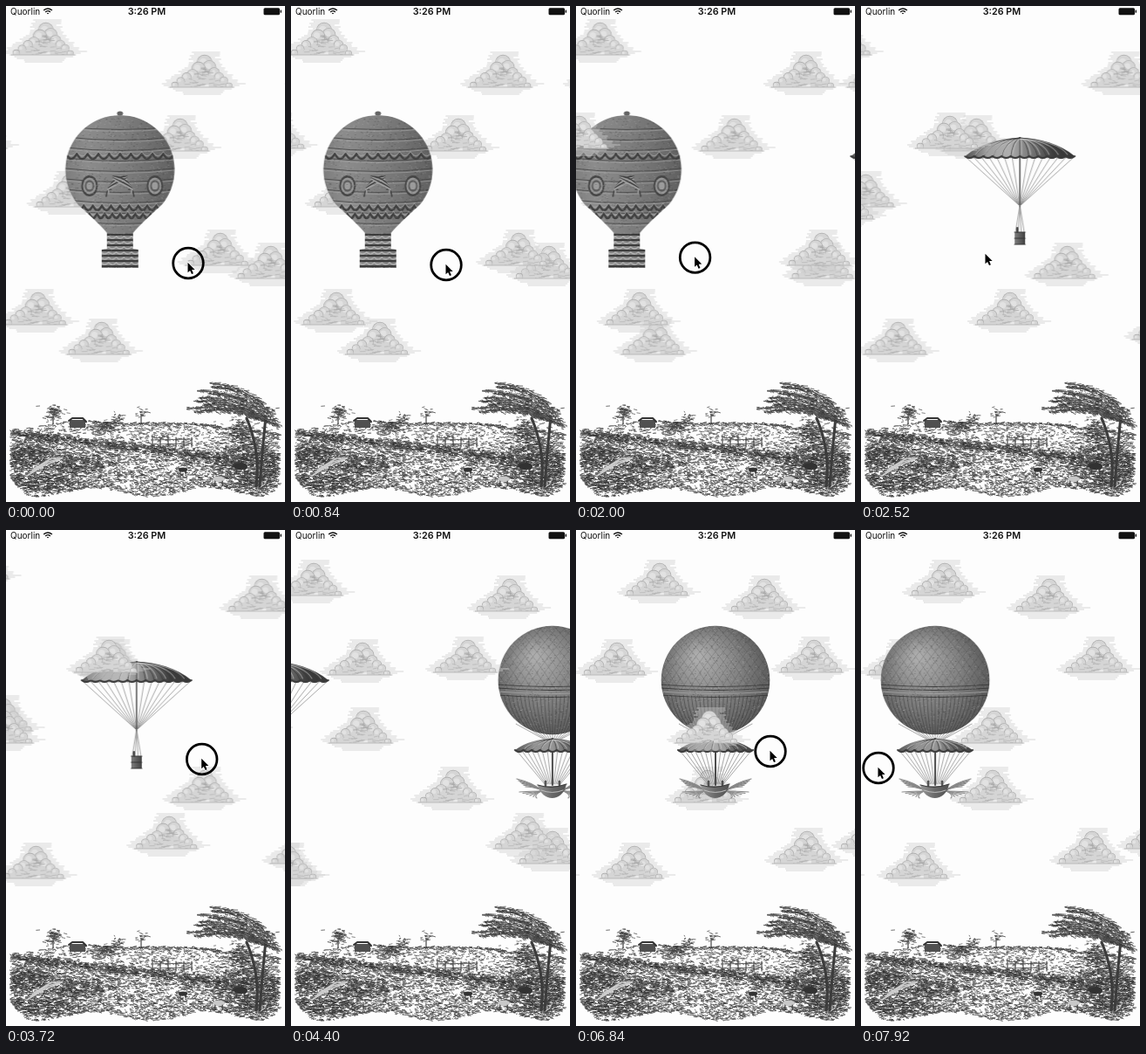
An HTML page with a canvas for the animation above (8000 ms loop, 320 by 568 pixels).

```html
<!DOCTYPE html>
<html>
<head>
<meta charset="utf-8">
<style>
  html, body { margin: 0; width: 320px; height: 568px; overflow: hidden; background: #fdfdfd; }
  canvas { display: block; }
</style>
</head>
<body>
<canvas id="stage" width="320" height="568"></canvas>
<script>
const stage = document.getElementById('stage').getContext('2d');
const LOOP = 8000, TAU = Math.PI * 2;

let seed = 7;
function rand(a = 0, b = 1) {
  seed = (seed * 1664525 + 1013904223) % 4294967296;
  return a + (b - a) * seed / 4294967296;
}
const gray = (v, a = 1) => `rgba(${v | 0},${v | 0},${v | 0},${a})`;
const clamp = (v, lo, hi) => Math.min(hi, Math.max(lo, v));
const mix = (a, b, u) => a + (b - a) * u;

// Pre-renders a picture whose origin sits at (ox, oy).
function sprite(w, h, ox, oy, draw) {
  const canvas = document.createElement('canvas');
  canvas.width = w;
  canvas.height = h;
  const c = canvas.getContext('2d');
  c.translate(ox, oy);
  c.lineCap = c.lineJoin = 'round';
  draw(c);
  return (x, y) => stage.drawImage(canvas, x - ox, y - oy);
}

function line(c, color, width, ...pts) {
  c.strokeStyle = color;
  c.lineWidth = width;
  c.beginPath();
  for (let i = 0; i < pts.length; i += 2) c.lineTo(pts[i], pts[i + 1]);
  c.stroke();
}

function curve(c, color, width, x0, y0, x1, y1, x2, y2) {
  c.strokeStyle = color;
  c.lineWidth = width;
  c.beginPath();
  c.moveTo(x0, y0);
  c.quadraticCurveTo(x1, y1, x2, y2);
  c.stroke();
}

function oval(c, color, x, y, rx, ry) {
  c.fillStyle = color;
  c.beginPath();
  c.ellipse(x, y, rx, ry, 0, 0, TAU);
  c.fill();
}

function swags(c, half, y, count, depth, color, width) {
  const step = 2 * half / count;
  for (let x = -half; x < half - 1; x += step)
    curve(c, color, width, x, y, x + step / 2, y + depth * 2, x + step, y);
}

function grain(c, n, half, top, bottom) {
  for (let i = 0; i < n; i++) {
    c.fillStyle = gray(rand() < .55 ? 40 : 200, .28);
    c.fillRect(rand(-half, half), rand(top, bottom), 1.4, .8);
  }
}

function shade(c, half, ...tones) {
  const g = c.createLinearGradient(-half, 0, half, 0);
  tones.forEach((t, i) => g.addColorStop(i / (tones.length - 1), gray(t)));
  return g;
}

// ---- clouds ----
const cloud = sprite(108, 60, 54, 30, c => {
  const hatchHalf = u => u < .75 ? 13 + 58 * u * u : 46 - 110 * (u - .75);
  for (let y = -24; y < 25; y += 2) {
    const u = (y + 24) / 48, shift = 4 - 5 * u;
    line(c, gray(205), .8, shift - hatchHalf(u) + rand(-4, 3), y, shift + hatchHalf(u) + rand(-3, 4), y);
  }
  // Lobes climb from both ends towards an off-centre tower.
  const lobes = [];
  for (let i = 0; i < 11; i++) {
    const u = i / 5 - 1, rise = (1 - Math.abs(u)) ** 1.25;
    lobes.push([u * 31 + 3 * rise, 14 - 26 * rise + rand(-2, 2), 3.5 + 5 * rise]);
  }
  lobes.sort((a, b) => a[1] - b[1]);
  c.save();
  c.beginPath();
  c.rect(-50, -30, 100, 46);
  c.clip();
  for (const [x, y, r] of lobes) {
    oval(c, gray(168), x, y, r + .6, r + .6);
    oval(c, gray(213), x, y, r, r);
    c.fillRect(x - r, y, 2 * r, 20);
    oval(c, gray(226), x - 1.5, y - 1, r * .5, r * .5);
  }
  for (let i = 0; i < 45; i++) {
    const y = rand(-6, 16), half = 8 + y * 1.1, x = rand(-half, half);
    line(c, gray(165, .6), .8, x, y, x + rand(2, 7), y + rand(-1, 1));
  }
  c.restore();
  line(c, gray(178), .8, -37, 16, 37, 16);
});

// [x, y] at scroll 0; far clouds drift left, near ones right.
const farClouds = [[50, 40], [373, 77], [204, 150], [77, 214], [308, 296], [422, 366], [114, 383]];
const nearClouds = [[-227, 59], [210, 77], [-50, 147], [-170, 228], [228, 281], [19, 349], [-256, 383]];

// ---- aircraft ----
function canopy(c, half, top, base, scallops, tones) {
  const control = top - (base - top) / 3, step = 2 * half / scallops;
  c.beginPath();
  c.moveTo(-half, base);
  c.bezierCurveTo(-half * .45, control, half * .45, control, half, base);
  for (let x = half; x > 1 - half; x -= step)
    c.quadraticCurveTo(x - step / 2, base + 5, x - step, base + 1);
  c.fillStyle = shade(c, half, ...tones);
  c.fill();
  for (let x = -half + step; x < half - 1; x += step) {
    curve(c, gray(55, .7), 1, 0, top, x * .8, top + 3, x, base + 2);
    curve(c, gray(215, .5), 1.2, 1, top + 1, x * .8 + 2, top + 4, x + 2, base - 2);
  }
  swags(c, half, base, scallops, 2, gray(60), 2);
}

function ropes(c, count, spread, y0, y1, end = 0) {
  for (let i = 0; i < count; i++) {
    const u = 2 * i / (count - 1) - 1;
    line(c, gray(130), .7, u * spread, y0, u * end, y1);
  }
}

function ornateHalf(y) {
  if (y < 228) return Math.sqrt(Math.max(0, 62.5 ** 2 - (y - 187.5) ** 2));
  if (y < 260) return 15 + 32.5 * ((260 - y) / 32) ** 1.1;
  return y < 279 ? 15 : 21;
}

const ornateBalloon = sprite(136, 192, 68, -116, c => {
  oval(c, gray(100), 0, 123, 3.5, 2.5);
  c.save();
  c.beginPath();
  for (let y = 125; y <= 300; y++) c.lineTo(ornateHalf(y), y);
  for (let y = 300; y >= 125; y--) c.lineTo(-ornateHalf(y), y);
  c.fillStyle = shade(c, 63, 125, 140, 132, 122, 110, 96);
  c.fill();
  c.clip();
  for (let y = 138; y < 260; y += 12) {
    curve(c, gray(70, .8), 1, -63, y, 0, y + 7, 63, y);
    curve(c, gray(170, .6), 1, -63, y + 2, 0, y + 9, 63, y + 2);
  }
  for (const [y, half] of [[169, 62], [228, 52], [237, 44]]) {
    swags(c, half, y, 10, 6, gray(65), 2.6);
    swags(c, half, y - 2, 10, 5, gray(175, .7), 1);
  }
  for (const x of [-35, 40]) {
    [70, 150, 95, 155].forEach((tone, i) => oval(c, gray(tone), x, 206, 9.5 - 2 * i, 12 - 2.6 * i));
  }
  for (const s of [-1, 1]) {
    for (let i = 0; i < 4; i++) {
      curve(c, gray(i % 2 ? 160 : 65), 1.5, s * -8, 195 + i, s * (12 + 5 * i), 196 + 7 * i, s * (16 - 3 * i), 218 - 4 * i);
    }
  }
  for (let y = 262; y < 300; y += 6) {
    line(c, gray(60), 2, -22, y, 22, y);
    swags(c, 22, y + 2, 5, 2, gray(180), 1.2);
  }
  grain(c, 1500, 64, 124, 300);
  c.restore();
});

const parachute = sprite(136, 130, 68, -148, c => {
  ropes(c, 15, 62, 173, 229);
  line(c, gray(85), 1.4, 0, 152, 0, 230);
  canopy(c, 63, 151, 172, 12, [80, 160, 175, 120, 62, 55]);
  ropes(c, 4, 0, 228, 259, 5);
  c.fillStyle = shade(c, 6, 125, 65);
  c.fillRect(-6, 259, 12, 14);
  for (let y = 259; y <= 273; y += 7) line(c, gray(55), 1.2, -6, y, 6, y);
  line(c, gray(65), 2.2, -3, 254, -3, 259);
});

const wingedBalloon = sprite(136, 208, 68, -106, c => {
  ropes(c, 13, 42, 222, 240, 9);
  const ball = c.createRadialGradient(-20, 145, 4, -4, 168, 70);
  [172, 146, 118, 88].forEach((v, i) => ball.addColorStop(i / 3, gray(v)));
  c.save();
  c.beginPath();
  c.arc(0, 172, 62.3, 0, TAU);
  c.fillStyle = ball;
  c.fill();
  c.clip();
  for (let i = -14; i <= 14; i++) {
    for (const s of [-1, 1])
      curve(c, gray(60, .3), .7, i * 9 - s * 30, 105, i * 9 + s * 8, 145, i * 9 + s * 30, 182);
    curve(c, gray(50, .5), .9, i * 4.6, 190, i * 4.3, 215, i * 2.2, 236);
  }
  for (let i = 0; i < 4; i++) curve(c, gray(i === 2 ? 160 : 60), 1.2, -63, 177 + 4 * i, 0, 182 + 4 * i, 63, 177 + 4 * i);
  grain(c, 1100, 63, 110, 235);
  c.restore();

  ropes(c, 15, 40, 254, 291, 9);
  line(c, gray(75), 2, 0, 244, 0, 292);
  canopy(c, 43, 239, 252, 9, [85, 145, 150, 100, 65]);
  for (const s of [-1, 1]) {
    for (let i = 0; i < 6; i++) {
      curve(c, gray(135), 1.2, s * 14, 297, s * 24, 289 + i, s * (41 - i * 2), 285 + i * 1.8);
      curve(c, gray(140), 1.1, s * 13, 299, s * 22, 299 + i, s * (38 - i * 4), 300 + i * 1.4);
    }
    line(c, gray(80), 2.5, s * 8, 288, s * 8, 293);
  }
  c.beginPath();
  c.moveTo(-17, 292);
  c.quadraticCurveTo(0, 297, 16, 291);
  c.bezierCurveTo(12, 312, -12, 312, -17, 292);
  c.fillStyle = shade(c, 17, 150, 105, 80);
  c.fill();
  curve(c, gray(60), 1.3, -17, 292, 0, 297, 16, 291);
  curve(c, gray(190), 1, -13, 298, 0, 303, 12, 298);
});

// ---- engraved landscape ----
// Soft dark patches: [x, y, rx, ry].
const bushes = [[54, 465, 7, 7], [155, 467, 5, 3], [126, 472, 5, 4], [112, 483, 9, 5],
  [24, 516, 26, 13], [80, 524, 36, 7], [285, 525, 34, 26], [268, 487, 10, 10], [40, 546, 36, 8]];
const bell = (d, width) => Math.exp(-((d / width) ** 2));
const skyline = x => 477 + 8 * bell(x, 50) + 12 * clamp((x - 210) / 100, 0, 1) - 3 * bell(x - 80, 30);
const groundEnd = x => 557 + 5 * Math.sin(x / 21) - 20 * bell(x, 14) - 12 * bell(x - 314, 12);

function inkAt(x, y) {
  let ink = 0;
  for (const [bx, by, rx, ry] of bushes) ink += bell(x - bx, rx) * bell(y - by, ry);
  if (y < skyline(x) || y > groundEnd(x)) return y > 500 ? 0 : ink;
  const hedge = bell(y - 488 - .12 * x, 4), field = bell(y - 516 - .07 * x, 6) * bell(x - 140, 80);
  const ridge = bell(y - skyline(x), 3) * (x > 95 ? 1 : .3);
  const hill = y < 486 + .1 * x ? .2 : .42;
  return ink + hill + .75 * hedge + .7 * ridge - .25 * field;
}

const landscape = sprite(320, 568, 0, 0, c => {
  for (let i = 0; i < 20000; i++) {
    const x = rand(4, 312), y = rand(454, 563), ink = inkAt(x, y);
    if (rand() > ink) continue;
    line(c, gray(rand(55, 125) - 25 * Math.min(1, ink)), .8, x, y, x + rand(1, 4), y + rand(-1, 1.2));
  }
  for (const x of [54, 155]) line(c, gray(70), 1.2, x, 467, x, 479);

  // cottage
  c.fillStyle = gray(80);
  c.fillRect(73, 474, 18, 9);
  line(c, gray(50), 2, 72, 475, 76, 472, 88, 472, 92, 476);

  // fallen logs, fence, grazing animals
  for (let d = 0; d < 12; d += 4) line(c, gray(205), 1.6, 24 + d, 538 - d, 44 + d, 526 - d, 64, 518);
  for (let x = 168; x < 215; x += 9) line(c, gray(60), 1.1, x, 494, x, 505);
  for (const y of [497, 502]) line(c, gray(70), .8, 166, y, 214, y - 1);
  for (const [x, y, r, tone] of [[203, 531, 5, 50], [269, 527, 8, 50], [244, 542, 7, 200]]) {
    oval(c, gray(tone), x, y, r, r * .5);
    for (const s of [-.6, .6]) line(c, gray(55), 1.2, x + s * r, y + 2, x + s * r, y + r);
  }

  // windswept tree: layered boughs fan out from the two trunks
  curve(c, gray(60), 3.2, 287, 550, 292, 510, 276, 472);
  curve(c, gray(60), 3, 291, 550, 294, 508, 298, 470);
  for (let k = 0; k < 9; k++) {
    const u = k / 8;
    const tipX = mix(234, 214, u) + 9 * Math.sin(k * 2.4), tipY = mix(432, 465, u);
    const endX = mix(312, 284, u), endY = mix(482, 472, u);
    const bendX = mix(292, 262, u), bendY = mix(438, 458, u);
    curve(c, gray(85), .9, tipX, tipY, bendX, bendY, endX, endY);
    for (let i = 0; i < 150; i++) {
      const v = rand() ** 1.2, w = 1 - v, spread = 1 + 7 * v * w;
      const x = w * w * tipX + 2 * v * w * bendX + v * v * endX + rand(-4, 4);
      const y = w * w * tipY + 2 * v * w * bendY + v * v * endY + rand(-spread, spread);
      line(c, gray(rand(45, 105)), .8, x, y, x + rand(1, 4), y + rand(-.5, 1.8));
    }
  }
});

// ---- pointer and scrolling ----
// Eased pointer moves: [from, until, x, y].
const moves = [[40, 640, 178, 297], [840, 1640, 118, 299], [1680, 2160, 143, 285], [2520, 2900, 235, 263],
  [3560, 4360, 137, 263], [4360, 4400, -30, 258], [6120, 6680, 223, 254], [6840, 7280, 78, 262],
  [7280, 7640, 112, 266], [7680, 7920, 20, 273]];

function pointerAt(t) {
  let x = 209, y = 295;
  for (const [from, until, toX, toY] of moves) {
    const u = clamp((t - from) / (until - from), 0, 1), eased = u * u * (3 - 2 * u);
    x = mix(x, toX, eased);
    y = mix(y, toY, eased);
  }
  return [x, y];
}

// Drags follow the pointer, releases glide to the page, the last page resists.
function scrollAt(t, x) {
  const glide = (page, start) => page - 224 * Math.exp((start - t) / 87);
  if (t < 2320) return 238.3 - x;
  if (t < 3560) return glide(320, 2320);
  if (t < 4360) return 555 - x;
  if (t < 6840) return glide(640, 4360);
  return 640 + 320 * (1 - 1 / (1 + (223 - x) * .482 / 320));
}

function drawPointer(t, x, y) {
  if (t >= 4390 && t < 6120) return;
  const c = stage;
  const press = t < 2320 || t >= 6840 ? 1 : t < 4360 ? clamp((t - 3200) / 160, 0, 1) : 0;
  c.strokeStyle = gray(0, press);
  c.lineWidth = 2.8;
  c.beginPath();
  c.arc(x, y - .5, 17.3, 0, TAU);
  c.stroke();
  c.beginPath();
  for (const [dx, dy] of [[0, 0], [0, 11.5], [2.6, 9.2], [4.5, 13.4], [6.4, 12.6], [4.6, 8.4], [8.2, 8.2]])
    c.lineTo(x + dx - .5, y + dy - 1.3);
  c.closePath();
  c.strokeStyle = '#fff';
  c.lineWidth = 1.6;
  c.stroke();
  c.fillStyle = '#000';
  c.fill();
}

function drawStatusBar() {
  const c = stage;
  c.fillStyle = c.strokeStyle = '#111';
  c.textAlign = 'left';
  c.font = '10px Inter, sans-serif';
  c.fillText('Quorlin', 5, 10);
  c.textAlign = 'center';
  c.font = '600 10.8px Inter, sans-serif';
  c.fillText('3:26 PM', 161.5, 10);
  c.lineWidth = 1.5;
  for (const r of [1, 3.8, 6.6]) {
    c.beginPath();
    c.arc(48, 9.5, r, -Math.PI * .76, -Math.PI * .24);
    c.stroke();
  }
  c.beginPath();
  c.roundRect(295.5, 2.2, 18.5, 8, 1.5);
  c.roundRect(314.6, 4.6, 1.4, 3.2, .6);
  c.fill();
}

const start = performance.now();
function frame() {
  const t = Math.max(0, performance.now() - start) % LOOP;
  const [x, y] = pointerAt(t), scroll = scrollAt(t, x);
  const drift = clamp(scroll, 0, 640);
  stage.fillStyle = '#fdfdfd';
  stage.fillRect(0, 0, 320, 568);
  landscape(0, 0);
  for (const [cx, cy] of farClouds) cloud(cx - drift * .25, cy);
  [ornateBalloon, parachute, wingedBalloon].forEach((craft, i) => craft(160 + 320 * i - scroll, 0));
  for (const [cx, cy] of nearClouds) cloud(cx + drift * .5, cy);
  drawStatusBar();
  drawPointer(t, x, y);
  requestAnimationFrame(frame);
}
frame();
</script>
</body>
</html>
```
